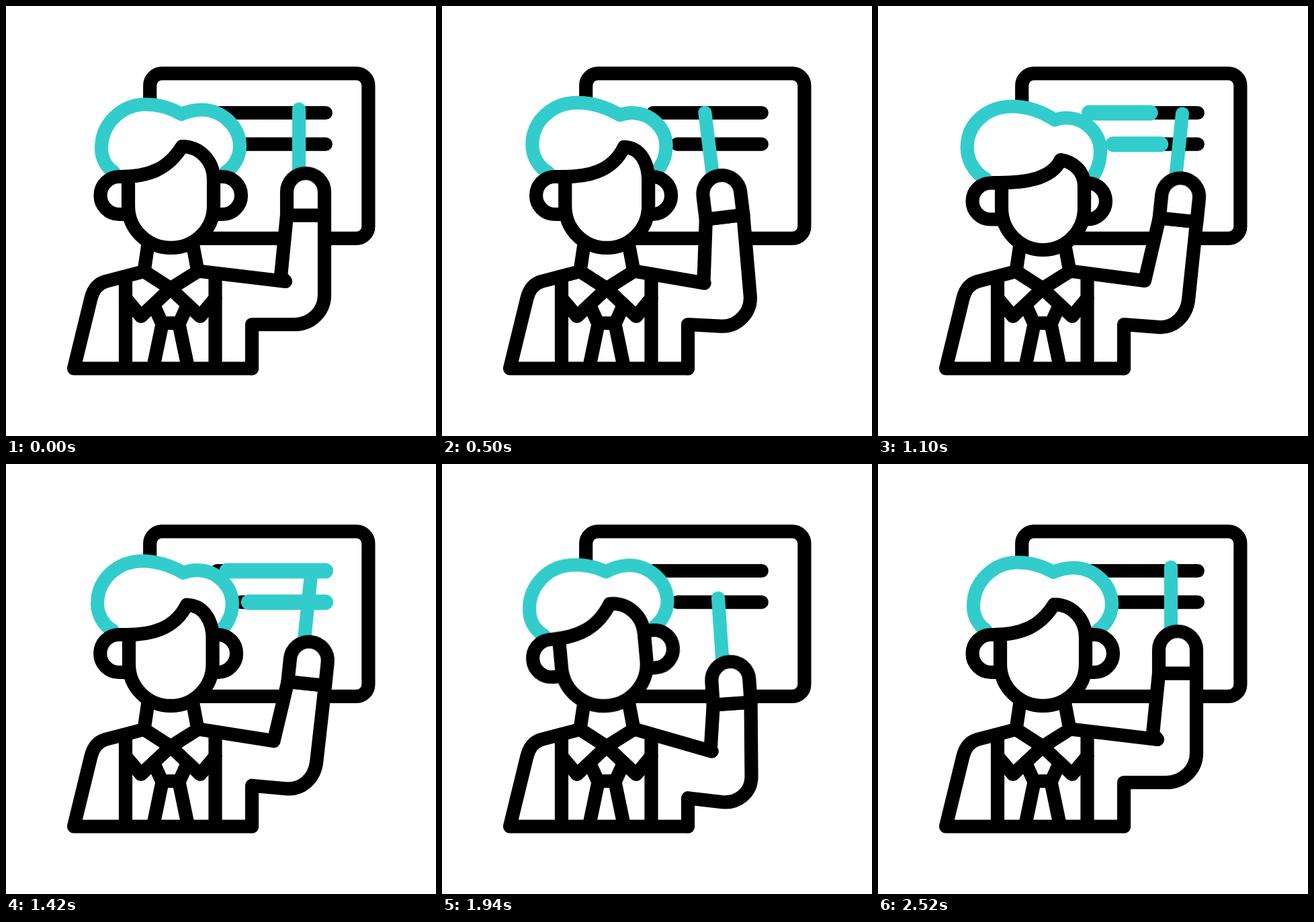
Animation, 640 px wide and 640 px high, one loop 2.8 s. Source, as an HTML page:

```html
<!DOCTYPE html>
<html lang="en">
<head>
<meta charset="utf-8">
<title>Teacher at the board</title>
<style>
html, body { margin: 0; width: 100%; height: 100%; overflow: hidden; background: #fff; }
svg { display: block; width: 100vw; height: 100vh; }
path, rect { fill: none; stroke: #000; stroke-width: 20.2; stroke-linecap: round; stroke-linejoin: round; }
.solid { fill: #fff; }
.plain { fill: #fff; stroke: none; }
.teal { stroke: #33cccc; }

/* Every part shares one clock and one smooth ease. */
.head, .turn, .arm, .hand, .mark {
  animation: 2800ms cubic-bezier(.33333, 0, .66667, 1) infinite;
}
.head { animation-name: tilt; transform-origin: 245px 345px; }
.turn { animation-name: turn; d: var(--rest); }
.arm  { animation-name: reach; d: var(--rest); }
.hand { animation-name: wave; }
.mark { animation-name: mark; stroke-width: 23; }

.hair {
  --rest: path("M160 247 C149 239 142 226 142 212 C142 175 172 146.5 208 146.5 C228 146.5 247 153 261 161 C270 157 280 154.5 291 154.5 C322 154.5 348 180 348 209 C348 225 339 240 326 248");
  --side: path("M158 248 C142 240 133 222 133 206 C133 169 164 143.5 201 143.5 C226 143.5 247 152 265.5 162.5 C272 160 278 159.5 283 160 C309 161 331 182 331 208 C331 222 326 236 318 246");
  --nod: path("M160 257 C142 248 132.7 227 132.7 211 C132.7 174 163 149.5 200 149.5 C225 149.5 245 158 263 169.5 C270 167 276 166.5 281 166.5 C308 167 331 189 331 216 C331 231 326 246 318 256");
}
/* The chin radii are a little small on purpose: the arc grows to a half ellipse. */
.face {
  --rest: path("M182 254 L182 298 A62 60.5 0 0 0 309 298 L309 254");
  --side: path("M183.5 254 L183.5 298 A60.2 60.5 0 0 0 306.8 298 L306.8 258");
  --nod: path("M184 263 L184 301 A60 60.5 0 0 0 307 301 L307 266");
}
.fringe {
  --rest: path("M172 254 C212 254 241 243 262 209 C288 209 309 230 309 258");
  --side: path("M172 254 C218 256 256 247 272.5 210 C296 211 307 232 307 262");
  --nod: path("M172 263 C218 264 258 258 272 229 C290 232 307 245 307 268");
}
.ear-l {
  --rest: path("M182 254 L168.5 254 A28 28 0 0 0 168.5 310 L182 310");
  --side: path("M183.5 254 L168 254 A28 28 0 0 0 168 310 L183.5 310");
  --nod: path("M184 263.5 L167.5 263.5 A27 27 0 0 0 167.5 317.5 L184 317.5");
}
.ear-r {
  --rest: path("M309 254 L322 254 A28 28 0 0 1 322 310 L309 310");
  --side: path("M307 254 L311.5 254 A28 28 0 0 1 311.5 310 L307 310");
  --nod: path("M307 263.5 L312 263.5 A27 27 0 0 1 312 317.5 L307 317.5");
}
.arm {
  --rest: path("M286 394.5 L416 410 L409 402 L418 311.5 L474 311.5 L474 430 C474 455 454 474 429 474 L366 474 L366 539.5");
  --left: path("M286 394.5 L386 413 L386 411 L388.3 318.7 L443.7 310.7 L456 432 C458 457 437 478.5 413 477 L366 474 L366 539.5");
  --right: path("M286 394.5 L398.6 408.4 L399 407 L423.3 315.1 L478.7 322.9 L463 437.8 C459.5 462 441 480 417.6 478 L366 474 L366 539.5");
  --low: path("M286 394.5 L399 431 L398 429 L401.1 367.2 L456.9 362.8 L458 472 C458 496 437 512 413 508.5 L366 501.5 L366 539.5");
}

@keyframes turn {
  0%, 7.14% { d: var(--rest); }
  21.43% { d: var(--side); }
  27.14%, 39.29% { d: var(--nod); }
  45.71% { d: var(--side); }
  58.57%, 100% { d: var(--rest); }
}
@keyframes tilt {
  0%, 58.57% { transform: rotate(0deg); }
  68.57% { transform: rotate(-5.2deg); }
  90%, 100% { transform: rotate(0deg); }
}
@keyframes reach {
  0%, 7.14% { d: var(--rest); }
  21.43%, 27.14% { d: var(--left); }
  42.86%, 46.43% { d: var(--right); }
  62.86% { d: var(--low); }
  88.57%, 100% { d: var(--rest); }
}
@keyframes wave {
  0%, 7.14% { transform: translate(446px, 311.5px) rotate(0deg); }
  21.43%, 27.14% { transform: translate(416px, 314.7px) rotate(-8.3deg); }
  42.86%, 46.43% { transform: translate(451px, 319px) rotate(8.1deg); }
  62.86% { transform: translate(429px, 365px) rotate(-4.6deg); }
  88.57%, 100% { transform: translate(446px, 311.5px) rotate(0deg); }
}
@keyframes mark {
  0%, 29.63% { opacity: 0; stroke-dasharray: 0 2; stroke-dashoffset: 0; }
  29.64% { opacity: 1; stroke-dasharray: 0 2; stroke-dashoffset: 0; }
  47.5% { opacity: 1; stroke-dasharray: 1 2; stroke-dashoffset: 0; }
  65% { opacity: 1; stroke-dasharray: 0 2; stroke-dashoffset: -1; }
  65.01%, 100% { opacity: 0; stroke-dasharray: 0 2; stroke-dashoffset: -1; }
}
</style>
</head>
<body>
<svg viewBox="0 0 640 640">
  <!-- board -->
  <rect class="solid" x="214.2" y="100.3" width="325.2" height="245.6" rx="18"/>
  <path d="M314.3 159H475.8M350 205.7H475.8"/>
  <path class="mark teal" pathLength="1" d="M314.5 159H475.5"/>
  <path class="mark teal" pathLength="1" d="M350 205.7H475.5"/>

  <!-- torso fill, then the raised arm -->
  <path class="plain" d="M101 539.5L126.5 435L148 410L206 395L211 350H278L286 395L311.5 405V539.5Z"/>
  <g class="hand"><path class="teal" d="M-10 -158V-55"/></g>
  <path class="arm solid"/>
  <g class="hand"><path class="solid" d="M-28 0V-34.5A28 28 0 0 1 28 -34.5V0Z"/></g>

  <!-- suit, collar and tie -->
  <path d="M366 539.5H101L126.5 435C130 421 138 413 148 410L205.5 395M178 406V539.5M311.5 403V539.5"/>
  <path d="M211 358L205.5 395L245 420.5L289 462L311.5 435M278.5 358L285.5 395L245 420.5L201 462L178 435"/>
  <path d="M222 450L232 472H258L268 450M232 476L219.5 536M258 476L270.5 536"/>

  <g class="head">
    <path class="turn hair teal solid"/>
    <path class="turn ear-l solid"/>
    <path class="turn ear-r solid"/>
    <path class="turn face solid"/>
    <path class="turn fringe solid"/>
  </g>
</svg>
</body>
</html>
```
